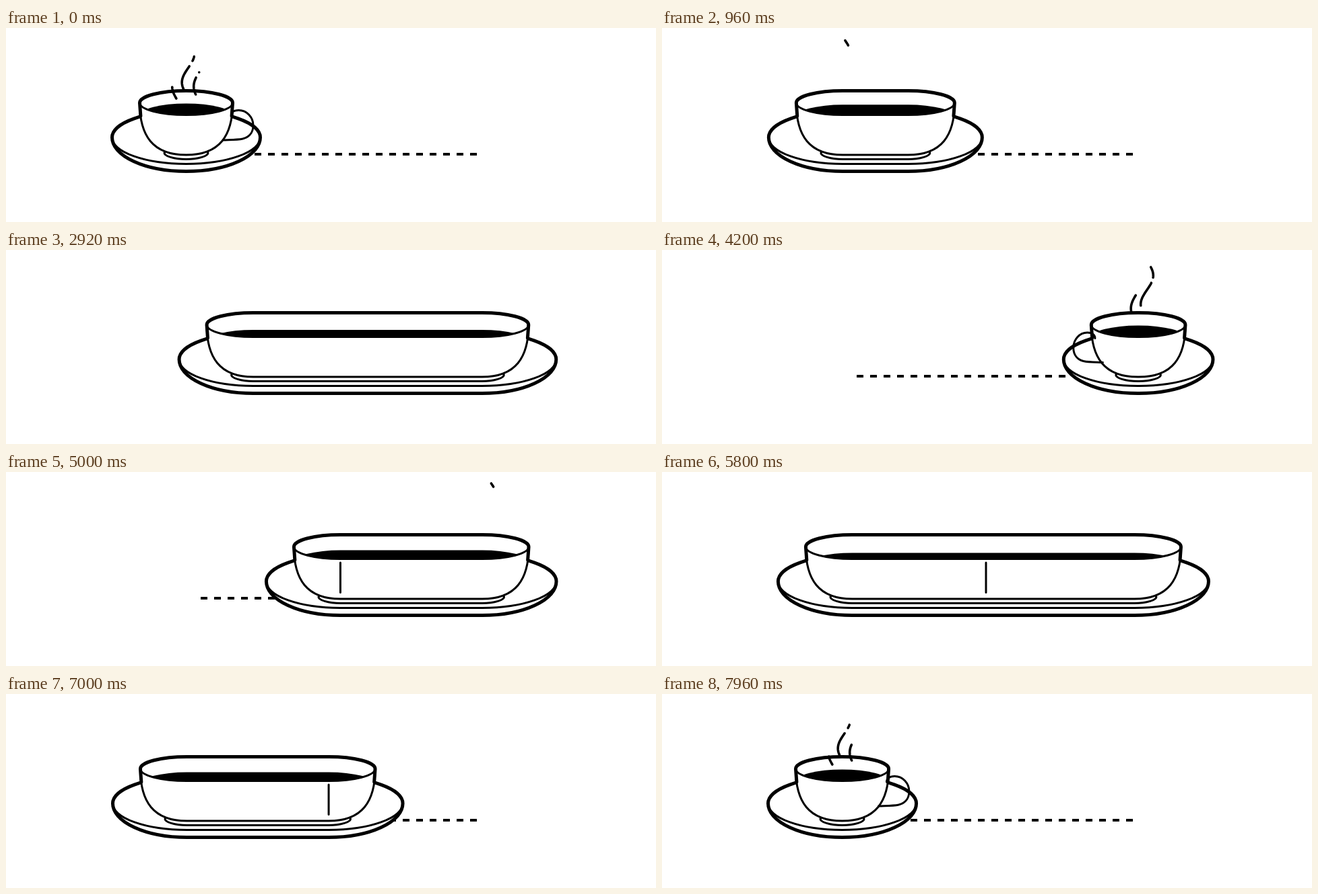
Recreate the animation shown at these times as an HTML page with a canvas. Size 965 by 289 pixels, loop 8000 ms.

```html
<!DOCTYPE html>
<html>
<head>
<meta charset="utf-8">
<style>
html, body { margin: 0; width: 965px; height: 289px; overflow: hidden; background: #fff; }
canvas { display: block; }
</style>
</head>
<body>
<canvas width="965" height="289"></canvas>
<script>
const ctx = document.querySelector('canvas').getContext('2d');
const PI = Math.PI, LEFT = 267.5, SPAN = 440.5, HALF = 4000, MIDDLE = 481;

// Slow start, a jump at one second, then a long settling.
function ease(t) {
  if (t < 1000) {
    const r = Math.cbrt(1 - t / 1000), s = 1 - r;
    return 0.37 * (s ** 3 + 2.13 * r * s * s);
  }
  const s = Math.cbrt(Math.min(1, (t - 999.2) / 3000)), r = 1 - s;
  return 1 - 0.63 * r ** 3 - 0.066 * r * r * s;
}

function stroke(width, draw) {
  ctx.beginPath();
  draw();
  ctx.lineWidth = width;
  ctx.stroke();
}

function topArc(a, b, y, rx, ry) {
  ctx.ellipse(a, y, rx, ry, 0, PI, 1.5 * PI);
  ctx.ellipse(b, y, rx, ry, 0, -0.5 * PI, 0);
}

function bottomArc(a, b, y, rx, ry) {
  ctx.ellipse(b, y, rx, ry, 0, 0, 0.5 * PI);
  ctx.ellipse(a, y, rx, ry, 0, 0.5 * PI, PI);
}

function oval(a, b, y, rx, ry) {
  ctx.beginPath();
  topArc(a, b, y, rx, ry);
  bottomArc(a, b, y, rx, ry);
  ctx.closePath();
}

function fill(color) {
  ctx.fillStyle = color;
  ctx.fill();
}

function saucer(a, b) {
  oval(a, b, 163, 110, 39.5);
  fill('#fff');
  ctx.beginPath();
  bottomArc(a, b, 163, 110, 50.5);
  fill('#fff');
  stroke(3, () => bottomArc(a, b, 163, 110, 39.5));
  stroke(5, () => {
    topArc(a, b, 163, 110, 39.5);
    bottomArc(a, b, 163, 110, 50.5);
    ctx.closePath();
  });
}

function cup(a, b) {
  ctx.beginPath();
  ctx.moveTo(a - 31.5, 184);
  ctx.bezierCurveTo(a - 37, 191, a - 15, 195.5, a, 195.5);
  ctx.lineTo(b, 195.5);
  ctx.bezierCurveTo(b + 15, 195.5, b + 37, 191, b + 31.5, 184);
  fill('#fff');
  ctx.lineWidth = 3;
  ctx.stroke();

  ctx.beginPath();
  ctx.moveTo(a - 69, 111.5);
  ctx.bezierCurveTo(a - 69, 160, a - 50, 189, a, 189);
  ctx.lineTo(b, 189);
  ctx.bezierCurveTo(b + 50, 189, b + 69, 160, b + 69, 111.5);
  fill('#fff');
  ctx.stroke();

  oval(a, b, 111.5, 69, 18);
  fill('#fff');
  ctx.save();
  ctx.clip();
  oval(a, b, 130.5 + 8 * (b - a) / 420, 69, 18);
  fill('#000');
  ctx.restore();
  stroke(3, () => bottomArc(a, b, 111.5, 69, 18));
  stroke(5, () => {
    ctx.moveTo(a - 67.6, 131);
    ctx.lineTo(a - 69, 111.5);
    topArc(a, b, 111.5, 69, 18);
    ctx.lineTo(b + 67.6, 131);
  });
}

// turn: 1 points right, 0 is seen edge-on, -1 points left
function handle(x, turn, front) {
  const dy = (front ? 12.5 : -12.5) * (1 - Math.abs(turn));
  const curve = (...p) => ctx.bezierCurveTo(...p.map((v, i) => i % 2 ? v + dy : x + turn * v));
  stroke(3, () => {
    ctx.moveTo(x + turn * 66, 131 + dy);
    curve(66, 126, 70, 122.5, 78, 122.5);
    curve(90, 122.5, 99.5, 133, 99.5, 145);
    curve(99.5, 157, 92, 163, 84, 165);
    curve(75, 167, 64, 166.5, 54, 167);
  });
}

function wisp(x, low, half, tail, gap, head, top) {
  const part = (from, to) => {
    if (from < to) return;
    stroke(3.6, () => {
      for (let y = from; y > to; y--) ctx.lineTo(at(y), y);
      ctx.lineTo(at(to), to - 0.01);
    });
  };
  const at = y => x - 9.3 * Math.cos(PI * (y - low) / half);
  head = Math.max(head, top);
  part(tail, Math.max(gap, head));
  part(Math.min(tail, gap - 8), head);
}

function steam(x, t, full) {
  const lift = 0.04 * t, late = t > 0 ? 3e-5 * t * t : 0;
  wisp(x + 3, 81, 43, Math.min(92, 92 - lift - late), 57 - lift, 42.5 - 0.085 * t, 14);
  wisp(x - 11.5, 87, 46, Math.min(105, 105 - 0.07 * t), 75.5 - lift, 88 - 0.13 * t, 40);
  if (full) wisp(x + 20.5, 87, 46, Math.min(99, 99 - 0.06 * t - late), 74 - lift, 66 - 0.085 * t, 40);
}

function draw(t) {
  const h = t % HALF, back = t >= HALF;
  const lead = ease(h), trail = 1 - ease(HALF - h);
  const a = LEFT + SPAN * (back ? 1 - lead : trail);
  const b = LEFT + SPAN * (back ? 1 - trail : lead);
  let turn = 0;
  if (h < 1000) turn = 1 - (h / 1000) ** 2;
  if (h > 3000) turn = ((HALF - h) / 1000) ** 2 - 1;
  if (back) turn = -turn;
  const hx = Math.min(b, Math.max(a, MIDDLE));

  ctx.fillStyle = '#fff';
  ctx.fillRect(0, 0, 965, 289);
  ctx.strokeStyle = '#000';
  ctx.lineCap = 'butt';
  ctx.setLineDash([10, 10]);
  stroke(4, () => { ctx.moveTo(289, 188); ctx.lineTo(699, 188); });
  ctx.setLineDash([]);
  ctx.lineCap = ctx.lineJoin = 'round';

  saucer(a, b);
  if (!back) handle(hx, turn, false);
  cup(a, b);
  if (back) handle(hx, turn, true);

  const s = (h + 500) % HALF - 500;
  if (s < 1300) {
    const onRight = back === (s >= 0);
    steam(onRight ? LEFT + 449.5 : LEFT, s, !onRight);
  }
}

// The motion advances 25 times a second.
function tick() {
  draw(Math.floor((performance.now() + 8) / 40) * 40 % (2 * HALF));
  requestAnimationFrame(tick);
}
tick();
</script>
</body>
</html>
```
